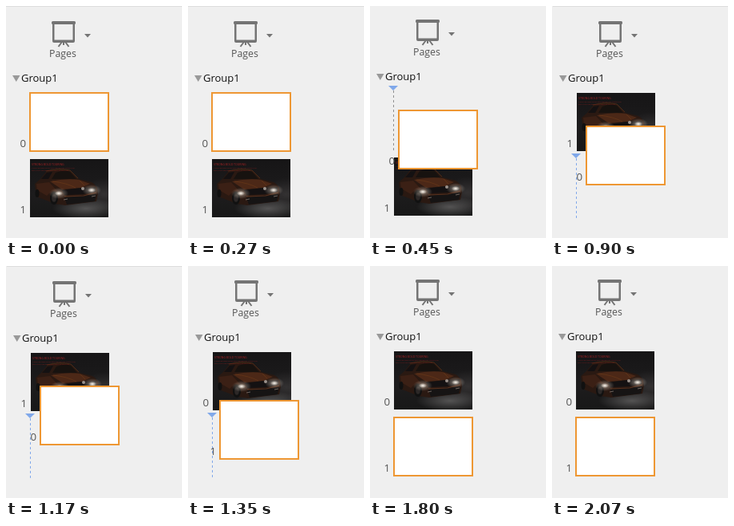
Recreate the animation shown at these times as an HTML page with a canvas. Size 220x291 px, loop 2250 ms.

```html
<!DOCTYPE html>
<html lang="en">
<head>
<meta charset="utf-8">
<title>Reordering pages</title>
<style>
  html, body { margin: 0; width: 100%; height: 100%; overflow: hidden; background: #efefef; }
  canvas { display: block; width: 220px; height: 291px; }
</style>
</head>
<body>
<canvas id="stage"></canvas>
<script>
const W = 220, H = 291, STEP = 450;
const GREY = '#747474', BLUE = '#80a8ea', ORANGE = '#ee9733', LABEL = '#555';
const FONT = '"Open Sans", "Noto Sans", sans-serif';

const canvas = document.getElementById('stage');
const ratio = window.devicePixelRatio || 1;
canvas.width = W * ratio;
canvas.height = H * ratio;
const ctx = canvas.getContext('2d');

// Each pose: view shift, blank page position, photo page slot, and drop marker.
const SLOTS = [109, 192];
const poses = [
  { shift: [0, 0], page: [29, 108], slot: 1 },
  { shift: [0, -2], page: [35, 132], slot: 1, marker: 102, dash: '#8f8f8f' },
  { shift: [1, 0], page: [41, 150], slot: 0, photoNo: 1, marker: 185, dash: BLUE },
  { shift: [1, -1], page: [38, 169], slot: 0, marker: 185, dash: BLUE },
  { shift: [0, -2], page: [29, 191], slot: 0 }
];

function rect(x, y, w, h, color) {
  ctx.fillStyle = color;
  ctx.fillRect(x, y, w, h);
}

function shape(d, color) {
  ctx.fillStyle = color;
  ctx.fill(new Path2D(d));
}

function line(d, color, width) {
  ctx.strokeStyle = color;
  ctx.lineWidth = width;
  ctx.stroke(new Path2D(d));
}

function oval(x, y, rx, ry, color) {
  ctx.beginPath();
  ctx.ellipse(x, y, rx, ry, 0, 0, 7);
  ctx.fillStyle = color;
  ctx.fill();
}

function text(str, x, y, size, color, weight = 400) {
  ctx.font = `${weight} ${size}px ${FONT}`;
  ctx.fillStyle = color;
  ctx.fillText(str, x, y);
}

function glow(x, y, rx, ry, rgb, alpha) {
  ctx.save();
  ctx.translate(x, y);
  ctx.scale(rx, ry);
  const g = ctx.createRadialGradient(0, 0, 0, 0, 0, 1);
  g.addColorStop(0, `rgba(${rgb},${alpha})`);
  g.addColorStop(1, `rgba(${rgb},0)`);
  rect(-1, -1, 2, 2, g);
  ctx.restore();
}

function drawHeader() {
  rect(0, 0, W, 1, '#dedede');
  // Presentation board
  ctx.fillStyle = GREY;
  ctx.beginPath();
  ctx.roundRect(57, 19, 30, 4, 1.5);
  ctx.roundRect(58, 21, 28, 25, 2);
  ctx.fill();
  rect(60.5, 23, 23, 19.5, '#efefef');
  line('M70 45 L65.5 51 M74 45 L78.5 51', GREY, 2);
  rect(71, 45, 2, 4, GREY);
  shape('M98 35 H106 L102 39.5 Z', GREY);
  text('Pages', 54, 64, 12.3, LABEL);
  shape('M8 87 H17.5 L12.75 95 Z', '#999');
  text('Group1', 19, 95, 13, '#111', 500);
}

function drawPhoto(x, y) {
  ctx.save();
  ctx.translate(x, y);
  ctx.beginPath();
  ctx.rect(0, 0, 98, 73);
  ctx.clip();
  const back = ctx.createLinearGradient(0, 0, 0, 73);
  back.addColorStop(0, '#161516');
  back.addColorStop(0.6, '#1d1c1d');
  back.addColorStop(1, '#181818');
  rect(0, 0, 98, 73, back);
  glow(92, 44, 28, 20, '110,105,105', 0.28);
  glow(70, 62, 42, 13, '165,163,163', 0.42);

  // Car body, glass and hood
  shape('M6 31 L13 25 L21 15 Q35 11 50 14 L61 25 L77 29 Q85 33 85 43 L83 53 L44 58 L31 56 L8 47 Z', '#2a1912');
  shape('M14 25 L21 17 L28 16 L23 25 Z', '#141112');
  shape('M27 25 L32 17 Q43 13 50 16 L58 25 Z', '#17120f');
  shape('M25 28 Q45 24 61 26 L75 31 L64 36 L40 38 Z', '#4c2817');
  shape('M8 31 L24 29 L34 40 L27 40 L21 46 L9 39 Z', '#3b2015');
  line('M28 28 Q46 30 57 36 M62 27 L68 33', '#653619', 0.8);
  line('M20 15 Q36 11 50 14 L60 24', '#553019', 0.8);

  // Grille, bumper and wheels
  shape('M40 39 L64 36 L82 35 L82 41 L66 44 L43 45 Z', '#141112');
  shape('M43 48 L83 44 L81 53 L46 57 Z', '#161414');
  line('M43 47 L67 46 L83 42', '#56301d', 1.2);
  oval(30, 49, 5, 8, '#111');
  oval(30, 49, 2.8, 4.8, '#2c2827');
  oval(9, 43, 2.5, 5, '#111');

  for (const [lx, ly] of [[36, 43], [77, 39]]) {
    glow(lx, ly, 12, 7, '255,240,222', 0.5);
    glow(lx, ly, 5, 3, '255,250,242', 0.95);
  }
  line('M42 51 L47 50 M77 47 L82 46', '#82776f', 0.8);
  oval(66, 37, 2, 2, '#9c938d');

  text('STRONG BOLD TOURING', 2, 8, 3.5, '#a32224');
  ['A bold new shape for the open road and city streets today', 'with a clear view ahead and a calm ride every day'].forEach(
    (s, i) => text(s, 2, 12 + i * 3, 2, '#7d2022'));
  ctx.restore();
}

function drawMarker(y, dash) {
  ctx.setLineDash([3, 3]);
  line(`M29.5 ${y + 6} V${y + 81}`, dash, 1);
  ctx.setLineDash([]);
  shape(`M23 ${y} H35 L29 ${y + 6} Z`, BLUE);
}

function drawPose({ shift, page: [px, py], slot, photoNo = slot, marker, dash }) {
  ctx.setTransform(ratio, 0, 0, ratio, 0, 0);
  rect(0, 0, W, H, '#efefef');
  ctx.translate(...shift);
  drawHeader();
  const top = SLOTS[slot];
  text(photoNo, 17.5, top + 68, 13.3, LABEL);
  drawPhoto(30, top);
  if (marker) drawMarker(marker, dash);
  text(1 - photoNo, px - 11.5, py + 69, 13.3, LABEL);
  rect(px, py, 100, 75, ORANGE);
  rect(px + 2, py + 2, 96, 71, '#fff');
}

function tick() {
  drawPose(poses[Math.floor(performance.now() / STEP) % poses.length]);
  requestAnimationFrame(tick);
}
tick();
</script>
</body>
</html>
```
